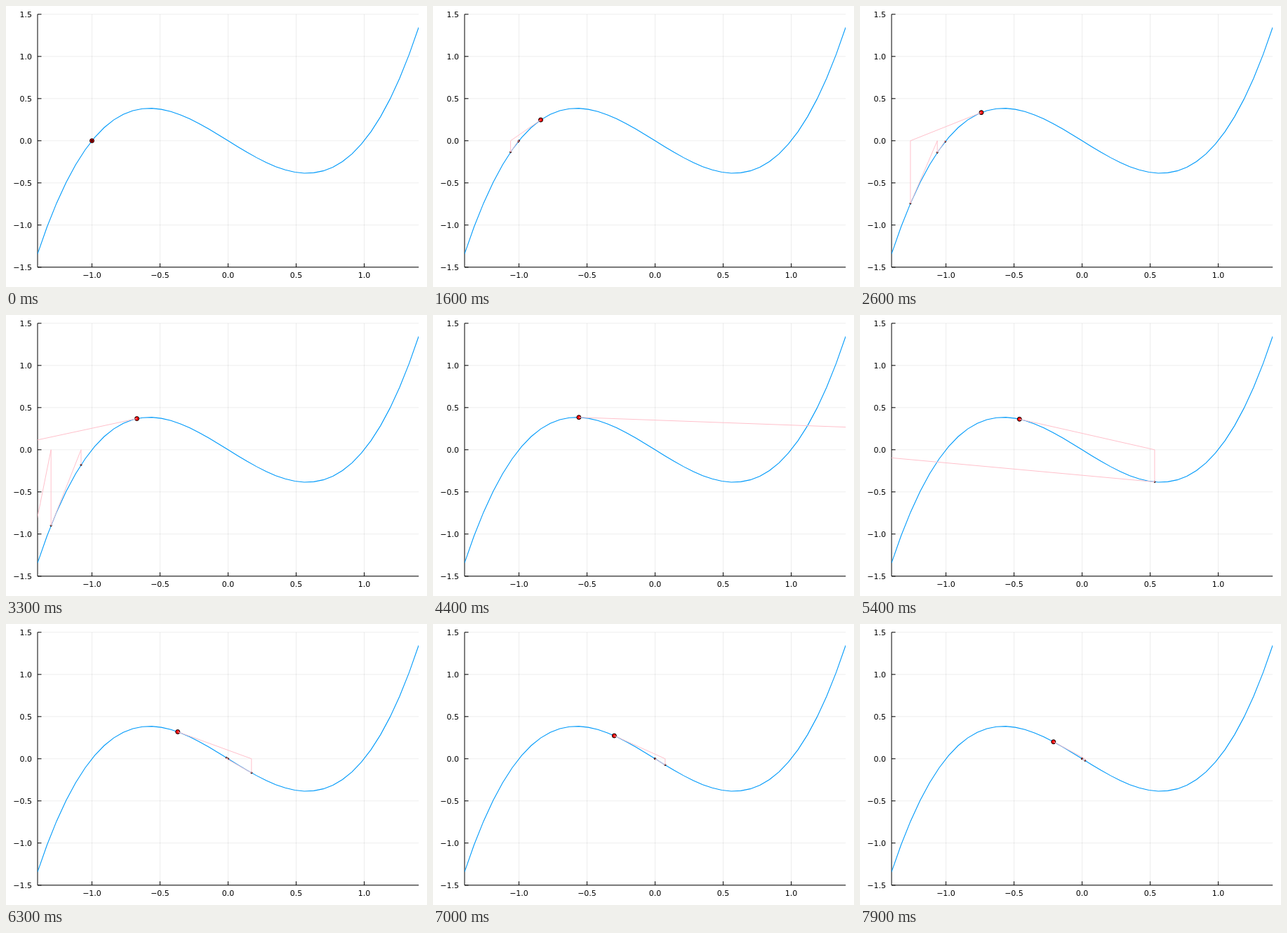
An HTML page with a canvas that plays this animation: 600 by 400 pixels, repeating every 8000 ms.

```html
<!DOCTYPE html>
<html lang="en">
<head>
<meta charset="utf-8">
<title>Newton iteration</title>
<style>
html, body { margin: 0; width: 600px; height: 400px; overflow: hidden; background: #fff; }
canvas { display: block; }
</style>
</head>
<body>
<canvas id="plot" width="600" height="400"></canvas>
<script>
const ctx = document.getElementById('plot').getContext('2d');
const LEFT = 45, RIGHT = 588.2, TOP = 11.8, BOTTOM = 371.8;
const STEP = 100, COUNT = 80, ITERATIONS = 3;

const px = x => 316.5 + 194 * x;
const py = y => 191.8 - 120 * y;
const f = x => x ** 3 - x;
const slope = x => 3 * x * x - 1;
const label = v => v.toFixed(1).replace('-', '\u2212');

function line(points, color, width = 1) {
  ctx.beginPath();
  for (const [x, y] of points) ctx.lineTo(x, y);
  ctx.strokeStyle = color;
  ctx.lineWidth = width;
  ctx.stroke();
}

function drawAxes() {
  ctx.font = '11px "DejaVu Sans", sans-serif';
  ctx.fillStyle = '#000';
  const grid = 'rgba(0,0,0,0.07)';
  ctx.textAlign = 'center';
  for (let v = -1; v <= 1; v += 0.5) {
    const x = px(v);
    line([[x, TOP], [x, BOTTOM]], grid);
    line([[x, BOTTOM], [x, BOTTOM - 5.5]], '#000');
    ctx.fillText(label(v), x, 387);
  }
  ctx.textAlign = 'right';
  for (let v = -1.5; v <= 1.5; v += 0.5) {
    const y = py(v);
    line([[LEFT, y], [RIGHT, y]], grid);
    line([[LEFT, y], [LEFT + 5.5, y]], '#000');
    ctx.fillText(label(v), 37, y + 4);
  }
  line([[LEFT, TOP], [LEFT, BOTTOM], [RIGHT, BOTTOM]], '#000');
}

function marker(x, r) {
  if (Math.abs(x) > 1.4) return;
  ctx.beginPath();
  ctx.arc(px(x), py(f(x)), r, 0, 2 * Math.PI);
  ctx.fillStyle = '#f00';
  ctx.fill();
  ctx.strokeStyle = '#000';
  ctx.lineWidth = 1;
  ctx.stroke();
}

function draw(start) {
  ctx.fillStyle = '#fff';
  ctx.fillRect(0, 0, 600, 400);
  drawAxes();

  const curve = Array.from({ length: 41 }, (_, i) => -1.4 + 0.07 * i);
  ctx.save();
  ctx.beginPath();
  ctx.rect(LEFT, TOP, RIGHT - LEFT, BOTTOM - TOP);
  ctx.clip();
  line(curve.map(x => [px(x), py(f(x))]), '#009afa', 1.1);
  ctx.restore();

  const path = [[px(start), py(f(start))]];
  marker(start, 3);
  for (let i = 0, x = start; i < ITERATIONS; i++) {
    x -= f(x) / slope(x);
    path.push([px(x), py(0)], [px(x), py(f(x))]);
    marker(x, 1);
  }

  ctx.save();
  ctx.beginPath();
  ctx.rect(LEFT, TOP, RIGHT - LEFT, BOTTOM - TOP);
  ctx.clip();
  ctx.lineJoin = 'bevel';
  line(path, '#ffc0cb');
  ctx.restore();
}

function tick() {
  const n = Math.floor(performance.now() / STEP) % COUNT;
  draw((n - 100) / 100);
  requestAnimationFrame(tick);
}
tick();
</script>
</body>
</html>
```
